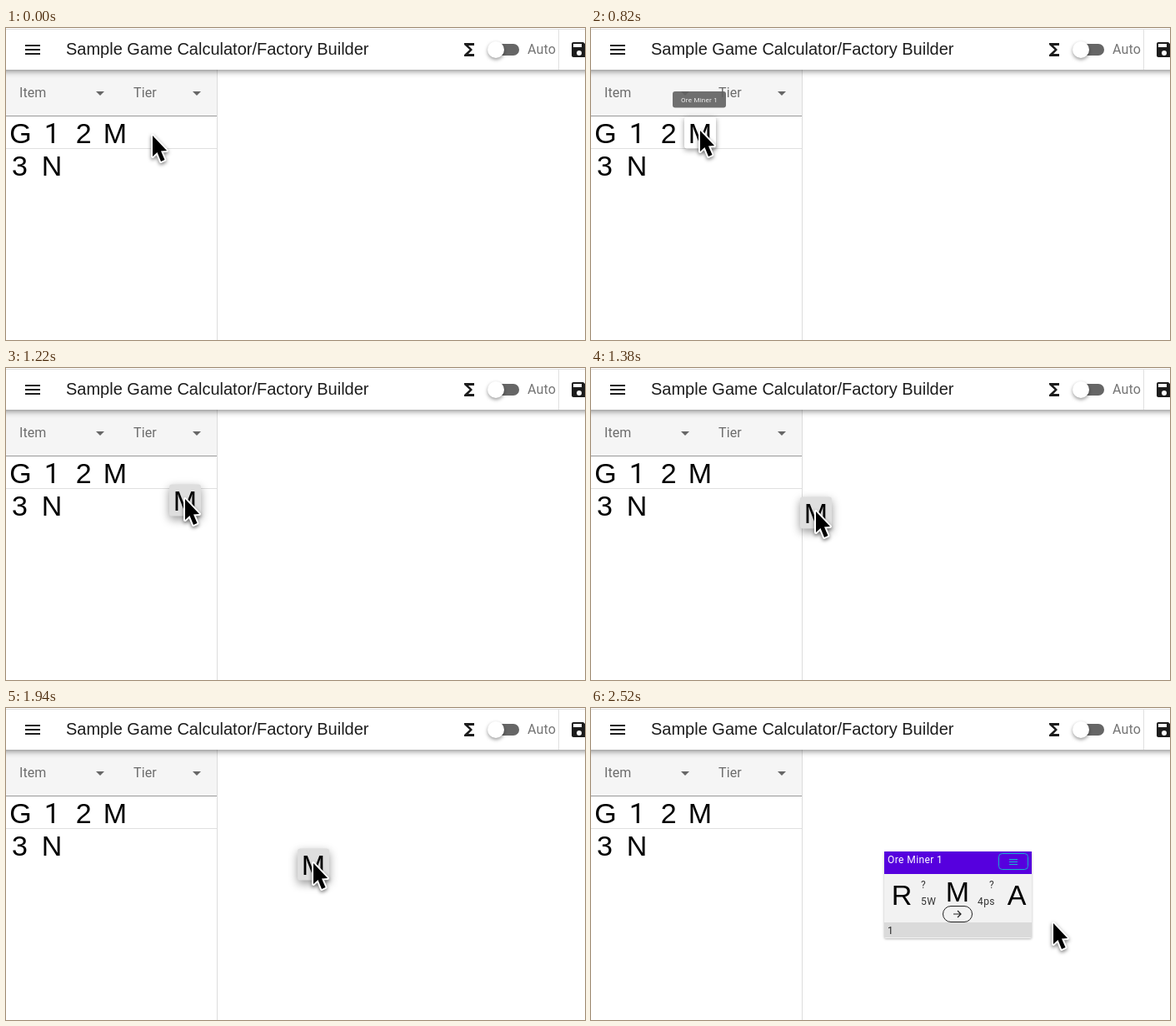
An HTML page with a canvas that plays this animation: 695 px wide and 374 px high, repeating every 2600 ms.

```html
<!DOCTYPE html>
<html lang="en">
<head>
<meta charset="utf-8">
<title>Factory builder drag and drop</title>
<style>
html, body { margin: 0; width: 100%; height: 100%; overflow: hidden; background: #fff; }
canvas { display: block; }
</style>
</head>
<body>
<canvas id="stage" width="695" height="374"></canvas>
<script>
const ctx = document.getElementById('stage').getContext('2d');
const SANS = '"Liberation Sans", Arial, sans-serif';
const UI = 'Roboto, "Open Sans", sans-serif';
const LOOP = 2600;

const icons = {
  menu: new Path2D('M3 18h18v-2H3zm0-5h18v-2H3zm0-7v2h18V6z'),
  sum: new Path2D('M18 4H6v2l6.5 6L6 18v2h12v-3h-7l5-5-5-5h7z'),
  save: new Path2D('M17 3H5c-1.1 0-2 .9-2 2v14c0 1.1.9 2 2 2h14c1.1 0 2-.9 2-2V7zm-5 16a3 3 0 1 1 0-6 3 3 0 0 1 0 6zm3-10H5V5h10z'),
  down: new Path2D('M0 0h10l-5 5z'),
  pointer: new Path2D('M0 0V25L5.5 20 10 31 14.5 29 10 18.5 17 18z')
};

// Pointer tip: time, x, y
const path = [
  [0, 176, 129], [90, 170, 124], [170, 162, 120], [250, 162, 120],
  [330, 131, 123], [980, 131, 123], [1060, 152, 132], [1220, 215, 157],
  [1380, 270, 172], [1540, 299, 178], [1700, 324, 180], [1940, 369, 186],
  [2200, 369, 186], [2280, 400, 200], [2360, 460, 225], [2440, 525, 248],
  [2520, 555, 258], [2600, 555, 258]
];

function pointerAt(t) {
  const i = Math.max(1, path.findIndex(p => p[0] >= t));
  const [t0, x0, y0] = path[i - 1], [t1, x1, y1] = path[i];
  const k = (t - t0) / (t1 - t0);
  return [x0 + (x1 - x0) * k, y0 + (y1 - y0) * k];
}

// The picture advances in 80 ms ticks, realigned at a few moments.
function tick(t) {
  const base = [2200, 500, 90, 0].find(b => b <= t);
  return base ? base + 80 * Math.floor((t - base) / 80) : 0;
}

function text(str, x, y, size, color, font = UI, spacing = 0, align = 'left') {
  ctx.font = `${size}px ${font}`;
  ctx.letterSpacing = spacing + 'px';
  ctx.textAlign = align;
  ctx.fillStyle = color;
  ctx.fillText(str, x, y);
}

function rect(x, y, w, h, color) {
  ctx.fillStyle = color;
  ctx.fillRect(x, y, w, h);
}

function round(x, y, w, h, r) {
  ctx.beginPath();
  ctx.roundRect(x, y, w, h, r);
}

function shadow(dy, blur, alpha) {
  ctx.shadowOffsetY = dy;
  ctx.shadowBlur = blur;
  ctx.shadowColor = `rgba(0,0,0,${alpha})`;
}

function raised(x, y, w, h, r, color, ...cast) {
  ctx.save();
  shadow(...cast);
  ctx.fillStyle = color;
  round(x, y, w, h, r);
  ctx.fill();
  ctx.restore();
}

function icon(shape, x, y, color) {
  ctx.save();
  ctx.translate(x, y);
  ctx.fillStyle = color;
  ctx.fill(shape);
  ctx.restore();
}

function letter(ch, x, y) {
  // Roboto's "1" has no foot
  text(ch, x, y, ch === '1' ? 33 : 34, '#000', ch === '1' ? UI : SANS, 0, 'center');
}

function page() {
  rect(0, 0, 695, 374, '#fff');
  rect(0, 50, 253, 55, '#f5f5f5');
  rect(0, 105, 253, 1, '#999');
  rect(0, 144, 253, 1, '#e0e0e0');
  rect(253, 50, 1, 324, '#dcdcdc');

  raised(-20, 0, 735, 50, 0, '#fff', 2, 7, 0.45);
  rect(0, 1, 695, 1, '#e0e0e0');
  rect(663, 2, 1, 48, '#e0e0e0');
  icon(icons.menu, 20, 14, '#1c1c1c');
  text('Sample Game Calculator/Factory Builder', 72, 32, 20, '#1c1c1c', SANS);
  icon(icons.sum, 544, 14, '#1c1c1c');
  icon(icons.save, 676, 14, '#1c1c1c');
  text('Auto', 626, 31, 16, '#757575', UI, 0.1);
  ctx.fillStyle = '#666';
  round(582, 19, 34, 14, 7);
  ctx.fill();
  raised(578, 16, 20, 20, 10, '#fff', 2, 4, 0.4);

  text('Item', 16, 83, 16, '#6c6c6c', UI, 0.1);
  text('Tier', 153, 83, 16, '#6c6c6c', UI, 0.1);
  icon(icons.down, 108, 76, '#666');
  icon(icons.down, 224, 76, '#666');
}

function parts() {
  [...'G12M'].forEach((ch, i) => letter(ch, 17.5 + 37.8 * i, 138));
  letter('3', 16.5, 177);
  letter('N', 55, 177);
}

function tile(x, y, color, ...cast) {
  raised(x, y, 38, 38, 3, color, ...cast);
  letter('M', x + 19, y + 31.5);
}

function tooltip(s) {
  ctx.save();
  ctx.translate(98 - 42 * (1 - s), 76 - 26 * (1 - s));
  ctx.scale(s, s);
  ctx.globalAlpha = 0.42 + (s - 0.5) * 0.96;
  ctx.fillStyle = '#616161';
  round(0, 0, 64, 19.5, 3);
  ctx.fill();
  if (s > 0.6) text('Ore Miner 1', 10, 12.5, 8, '#fff', UI, 0.25);
  ctx.restore();
}

function outline(x, y, w, h, r, color) {
  ctx.strokeStyle = color;
  ctx.lineWidth = 1;
  round(x + 0.5, y + 0.5, w - 1, h - 1, r);
  ctx.stroke();
}

function card(hover) {
  raised(352, 172, 177, 104, 2, '#f2f2f2', ...(hover ? [2, 7, 0.5] : [1, 3, 0.3]));
  rect(352, 172, 177, 27, '#5600de');
  rect(352, 257, 177, 18, '#dadada');
  text('Ore Miner 1', 356, 186, 12, '#fff', UI, 0.4);
  outline(489, 174, 36, 20, 4, '#18aed0');
  for (const y of [181, 184, 187]) rect(502, y, 10, 1, '#18b5d0');

  letter('R', 373, 236);
  letter('M', 440, 231.5);
  letter('A', 511, 236);
  text('?', 396, 216, 12, '#333', UI, 0.4);
  text('?', 478, 216, 12, '#333', UI, 0.4);
  text('5W', 396, 236, 12, '#333', UI, 0.4);
  text('4ps', 464, 236, 12, '#333', UI, 0.4);
  text('1', 356, 271, 12, '#222', UI, 0.4);

  outline(422, 237, 36, 20, 10, '#222');
  ctx.lineWidth = 1.2;
  ctx.stroke(new Path2D('M435 247h8.5M440 243l4 4-4 4'));
}

function pointer(x, y) {
  ctx.save();
  ctx.translate(x, y);
  ctx.save();
  shadow(2, 4, 0.5);
  ctx.strokeStyle = '#fff';
  ctx.lineWidth = 4;
  ctx.lineJoin = 'round';
  ctx.stroke(icons.pointer);
  ctx.restore();
  ctx.fillStyle = '#000';
  ctx.fill(icons.pointer);
  ctx.restore();
}

function draw(now) {
  const t = tick(now % LOOP);
  const [x, y] = pointerAt(t);
  page();
  parts();

  if (t >= 330 && t < 980) tile(112, 106.5, '#fff', 2, 6, 0.4);
  if (t >= 500 && t <= 1060) {
    tooltip(Math.min(1, 0.5 + (t - 500) / 480, 1 - (t - 900) / 320));
  }
  if (t >= 980 && t < 2200) {
    const lifted = t > 1060;
    tile(lifted ? x - 19 : 112, lifted ? y - 17.5 : 106, '#dedede', 4, 11, 0.4);
  }
  if (t >= 2200) card(x < 529);
  pointer(x, y);
  requestAnimationFrame(draw);
}

ctx.fontKerning = 'none';
requestAnimationFrame(draw);
</script>
</body>
</html>
```
